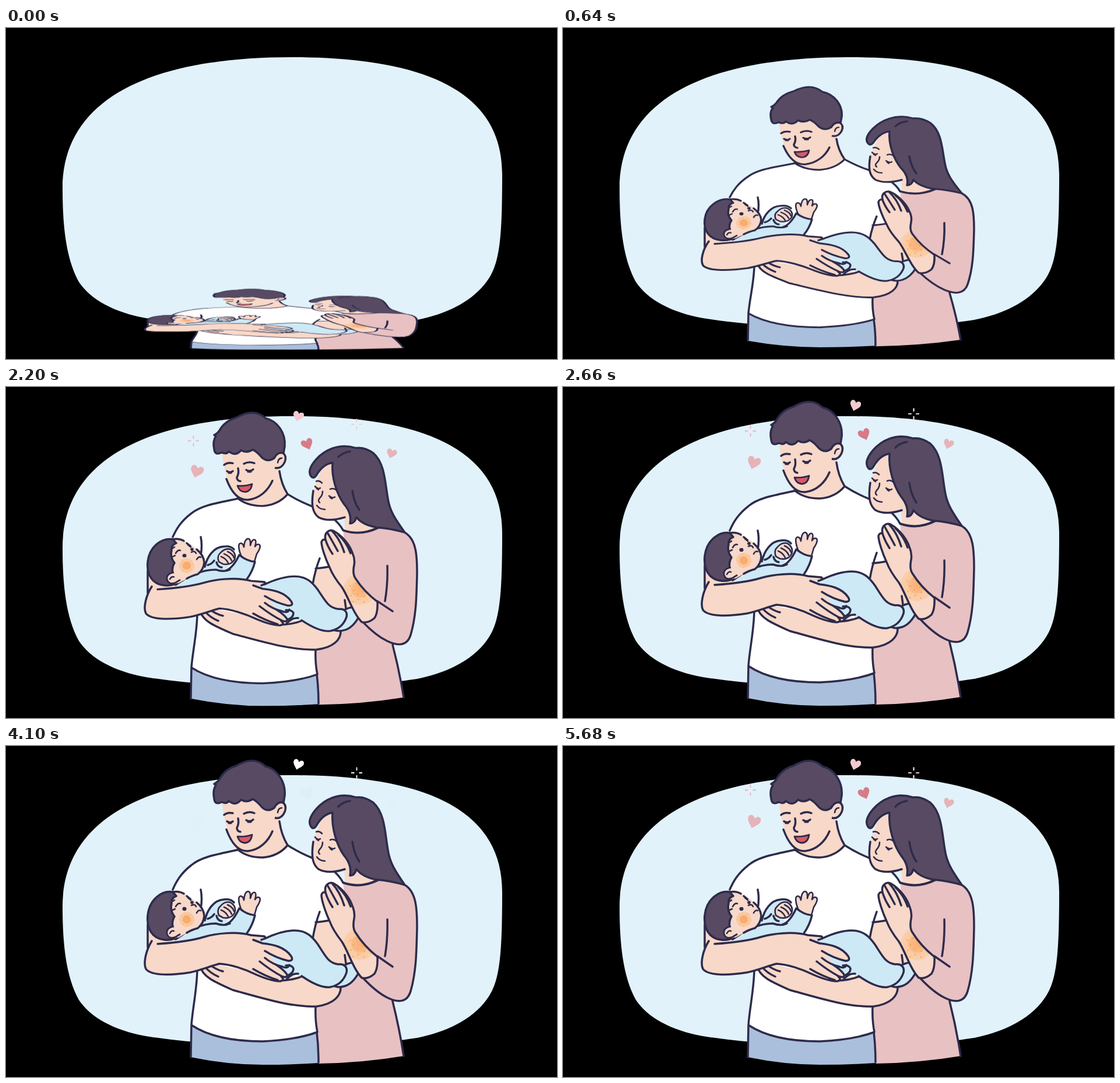
These frames come from a looping animation (945x567 px, 6 s). An HTML page:

```html
<!DOCTYPE html>
<html lang="en">
<head>
<meta charset="utf-8">
<title>Young family</title>
<style>
html, body { margin: 0; width: 100%; height: 100%; overflow: hidden; background: #000; }
svg { display: block; width: 100vw; height: 100vh; }
.line { fill: none; stroke: #2d2b4b; stroke-width: 3.5; stroke-linecap: round; stroke-linejoin: round; }
.thin { stroke-width: 2.6; }
.skin { fill: #f8d8c9; }
.hair { fill: #584a63; }
.shirt { fill: #fff; }
.jeans { fill: #aabfdc; }
.dress { fill: #e8c1c3; }
.baby { fill: #cde9f5; }
.edge { stroke: #2d2b4b; stroke-width: 3.5; stroke-linejoin: round; }
.dots { fill: #f0954f; }
</style>
</head>
<body>
<svg viewBox="0 0 945 567">
  <defs>
    <path id="heart" d="M0 10C-4 5-10 1-10-4C-10-11-2-11 0-5C2-11 10-11 10-4C10 1 4 5 0 10Z"/>
    <path id="spark" d="M0-9.5V-4M0 4V9.5M-9.5 0H-4M4 0H9.5" fill="none" stroke-width="1.8"/>
    <g id="charms">
      <use href="#heart" transform="translate(327 130) rotate(17) scale(1.12)" class="c1"/>
      <use href="#heart" transform="translate(501 32) rotate(17) scale(.9)" class="c2"/>
      <use href="#heart" transform="translate(517 81.500) rotate(-22)" class="c3"/>
      <use href="#heart" transform="translate(661 98) rotate(17) scale(.86)" class="c1"/>
      <use href="#spark" x="321.500" y="75.500" class="s1"/>
      <use href="#spark" x="601.500" y="46" class="s2"/>
    </g>
    <radialGradient id="rash">
      <stop offset="0" stop-color="#f9b076"/>
      <stop offset=".5" stop-color="#fabb86"/>
      <stop offset=".58" stop-color="#fbcaa0"/>
      <stop offset="1" stop-color="#f9cfac"/>
    </radialGradient>
    <path id="forearm" d="M555 300C548 285 541 264 541 255Q543 249 548 251Q546 241 551 237Q557 232 563 236C577 244 590 261 594 274Q599 285 597 296Q594 311 599 319C609 335 623 350 637 361Q638 381 632 390Q621 400 610 397C595 381 587 352 576 335Q561 316 555 300Z"/>
    <clipPath id="armClip"><use href="#forearm"/></clipPath>
  </defs>

  <g class="squash"><g id="matte"><use href="#charms" style="--a:#fff;--b:#fff;--c:#fff"/></g></g>
  <path fill="#e1f2fb" d="M97 275C97 120 250 50 490 50C740 50 851 120 851 250C851 370 846 410 820 440C795 470 755 490 705 500C640 510 560 514 470 514C390 513 310 508 240 497C185 487 145 465 125 435C103 395 97 340 97 275Z"/>

  <g class="squash">
    <g id="glow"><use href="#charms" style="--a:#e6b3b8;--b:#f2cad0;--c:#d67b87"/></g>

    <!-- dress -->
    <path class="dress" d="M578 234Q608 245 638 230L684 238C704 250 705 280 705 310C704 350 704 385 694 420C688 438 678 440 663 437Q675 485 682 531Q610 543 536 544L528 440L565 300Z"/>
    <path class="line" d="M578 234Q608 245 638 230M684 238C704 250 705 280 705 310C704 350 704 385 694 420C688 440 672 440 654 431C638 423 625 411 612 397M663 437Q675 485 682 531"/>

    <!-- man: clothes -->
    <path class="jeans" d="M318 478L317 533Q380 546 440 546Q490 546 536 543L534 490Z"/>
    <path class="shirt" d="M397 178C360 186 335 190 318 204C300 218 292 232 286 246L280 330L328 360V385C327 420 320 450 318 478Q360 506 440 506Q500 503 534 490L531 446L530 302L553 299L582 270L578 234Q560 214 525 192Q505 182 483 170Z"/>
    <path class="line" d="M397 178C360 186 335 190 318 204C300 218 292 232 286 246M328 385C327 420 320 450 318 478Q360 506 440 506Q500 503 534 490M483 170Q505 184 526 192Q566 210 578 234M531 446Q530 470 534 490M318 478L317 533M533 490Q536 515 536 542M334 246Q337 260 334 280"/>

    <!-- man: head -->
    <path class="skin" d="M370 93C373 130 388 172 397 178Q413 191 440 191Q467 189 483 170Q472 154 468 126L479 112V98L450 70H380Z"/>
    <path class="line" d="M397 177Q413 191 440 191Q467 189 483 170Q472 152 469 129M378 143C386 165 397 181 415 180C435 178 450 163 457 146"/>
    <path class="skin edge" d="M460 104Q466 94 475 97Q482 102 478 113Q472 126 461 123"/>
    <path class="line thin" d="M466 114Q467 106 473 106"/>
    <path class="hair edge" d="M357 65Q363 62 366 57Q375 40 395 34Q425 16 445 35C466 40 480 62 478 85L476 97Q466 94 460 106Q449 114 439 105Q430 94 423 91Q413 98 403 92Q394 104 382 94Q379 100 370 96Q358 102 357 90Q354 76 360 67Z"/>
    <path class="line" d="M374 118Q380 113 389 115M408 116Q417 111 426 115M398 124Q400 133 396 140Q396 146 402 147"/>
    <path class="line" d="M379 129Q385 133 389 129M382 132H386M412 127Q419 131 424 126M415 130H420"/>
    <path class="edge" fill="#dc5865" d="M397 155Q411 156 422 152Q420 166 409 166Q400 165 397 155Z" style="stroke-width:2.8"/>

    <!-- man: far arm -->
    <path class="skin" d="M531 302L553 299L590 330V380L574 415C575 430 562 443 533 446C490 448 440 432 389 418C355 403 338 395 333 378Q338 371 348 372L440 390L500 395L526 330Z"/>
    <path class="line" d="M538 284Q530 306 526 330M531 302Q542 301 553 299M333 378C338 395 355 403 389 418C440 432 490 448 533 446C562 442 575 428 574 412M333 378Q336 372 345 373M341 378Q350 389 364 395M350 375Q360 383 372 386M462 402Q490 403 512 393M581 358L584 380"/>

    <!-- baby: legs -->
    <path class="baby edge" d="M578 377Q592 368 602 373L606 386Q596 406 582 411Q567 416 558 408Z"/>
    <path class="baby" d="M405 325L444 330C465 320 480 316 495 316C515 316 525 326 535 340C548 360 553 372 570 374C580 373 586 378 584 388C580 400 572 410 556 413C540 415 520 403 507 394C495 388 480 395 470 404L420 380Z"/>
    <path class="line" d="M444 330C465 320 480 316 495 316C515 316 525 326 535 340C548 360 553 372 570 374C580 373 586 378 584 388C580 400 572 410 556 413C540 415 520 403 507 394M481 400Q490 389 501 390M480 376Q490 375 493 381Q493 390 482 393"/>

    <!-- baby: body -->
    <path class="skin" d="M243 306V350L305 345V310Z"/>
    <path class="line" d="M243 306V345"/>
    <path class="baby" d="M330 318L340 300C343 280 357 264 373 263Q387 262 393 272L375 310Z"/>
    <path class="line" d="M341 299C345 280 357 264 373 263Q385 261 391 268M346 296Q353 294 357 288M361 291Q363 299 370 300"/>
    <path class="skin edge" style="stroke-width:2.6" d="M365 290Q361 280 368 274Q376 265 385 268Q396 275 392 286Q386 297 372 294Z"/>
    <path class="line thin" d="M369 281Q377 284 381 292M374 276Q384 280 387 288M380 272Q389 276 391 283"/>
    <path class="skin edge" style="stroke-width:2.6" d="M403 279C399 268 397 257 403 257Q407 258 408 264Q409 250 415 249Q420 249 419 261Q422 249 427 251Q430 253 427 263Q431 257 435 260Q438 264 430 276L426 290Q412 289 403 279Z"/>
    <path class="baby" d="M282 340C310 322 335 305 360 306Q375 309 384 304L400 278Q413 288 427 290Q422 308 413 322V340L280 348Z"/>
    <path class="line" d="M291 331C315 315 335 304 360 304Q374 309 384 304M376 306Q389 302 400 278Q413 289 427 290Q423 307 413 321"/>

    <!-- baby: head -->
    <path class="skin" d="M284 250Q300 246 313 258Q335 268 340 290Q341 305 330 312Q310 320 296 328L275 329L265 290Z"/>
    <path class="line" d="M286 250Q297 248 305 253M310 257L316 262M327 268Q339 278 340 291Q339 304 329 312Q318 315 310 320"/>
    <path class="hair edge" d="M286 250C268 247 246 262 243 290C241 312 250 330 272 332Q280 333 289 330L282 322L286 311Q284 300 289 292Q281 282 284 270Q283 260 292 257Z"/>
    <path class="skin edge" style="stroke-width:2.8" d="M288 309Q275 311 276 321Q279 332 291 327L299 322"/>
    <path class="line thin" d="M281 321Q284 315 288 317M284 267L289 264M286 281L290 279M291 275Q295 268 299 270M312 260L317 264"/>
    <ellipse cx="306" cy="279" rx="3.500" ry="3.200" fill="#2d2b4b"/>
    <circle cx="319" cy="268" r="2.800" fill="#2d2b4b"/>
    <path class="line thin" d="M318 273Q324 270 326 275M327 286Q330 280 334 282"/>
    <circle cx="310" cy="297" r="13" fill="#fbc493" opacity=".7"/>
    <circle cx="310" cy="297" r="7" fill="#f9ad70"/>
    <g id="cheek" class="dots" opacity=".7"></g>

    <!-- man: near arm -->
    <path class="skin" d="M249 335C240 350 235 372 240 382C250 395 290 392 315 388C335 384 350 377 366 373C385 374 410 382 430 392Q455 403 470 403Q477 402 473 396Q485 400 482 393Q478 384 465 376Q456 364 448 352Q470 363 484 368Q494 368 489 360C478 344 458 340 440 338L424 333Q440 333 445 329Q440 323 420 324C395 317 355 322 340 327C310 335 285 337 262 337Z"/>
    <path class="line" d="M250 334C240 350 235 372 240 382C250 395 290 392 315 388C335 384 350 377 366 373C385 374 410 382 430 392Q455 403 470 403Q479 401 472 395M435 369Q455 385 474 395Q485 398 481 390Q475 382 462 374M424 382Q444 394 466 401M444 351Q463 363 484 368Q494 368 489 360C478 344 458 340 440 338L424 332M444 363Q457 374 474 378Q483 382 486 375M260 339C290 337 320 333 340 327C360 321 395 317 420 324L443 326Q448 329 438 332"/>

    <!-- woman: head -->
    <path class="skin" d="M528 160C523 190 526 203 536 211Q550 219 580 214L582 235Q608 243 636 230L605 150L562 110L540 128Z"/>
    <path class="line" d="M527 164C523 190 526 203 536 211Q553 220 581 211M578 234Q608 244 636 230"/>
    <path class="hair edge" d="M560 114C558 140 567 170 580 188C590 200 592 212 590 222Q598 222 601 211Q612 225 636 229Q660 231 684 238C668 215 658 200 655 178C650 150 650 115 630 97Q615 86 600 88C570 78 545 93 532 108C520 122 519 132 523 138Q527 144 532 137Q543 117 560 114Z"/>
    <path class="line" d="M594 164Q597 185 606 198M570 104Q577 96 590 94"/>
    <path class="line thin" d="M532 147Q537 145 542 150M556 161Q562 158 568 164M530 156Q535 162 539 159M533 160L536 162M554 173Q560 178 564 175M556 176L559 178M543 165Q543 172 538 177Q534 182 538 185M533 190Q538 197 547 197"/>

    <!-- woman: clasped hands and forearm -->
    <use href="#forearm" class="skin"/>
    <g clip-path="url(#armClip)">
      <circle cx="607" cy="339" r="28" fill="url(#rash)"/>
      <g id="wrist" class="dots"></g>
    </g>
    <use href="#forearm" class="line"/>
    <path class="line" d="M548 251Q552 264 560 276M551 238Q560 254 569 271M559 235Q573 250 580 273M570 242Q584 255 591 275M654 297Q655 330 650 360M637 360L663 378"/>
  </g>
</svg>
<style>
.c1 { fill: var(--a); } .c2 { fill: var(--b); } .c3 { fill: var(--c); }
.s1 { stroke: var(--a); } .s2 { stroke: var(--b); }
</style>
<script>
const LOOP = 6000, HALF = 3020, STEP = 20, FLOOR = 552.5;
const $ = id => document.getElementById(id);
const squash = document.querySelectorAll('.squash');
const clamp = x => Math.min(1, Math.max(0, x));
const ease = x => (1 - Math.cos(Math.PI * clamp(x))) / 2;

function freckles(id, cx, cy, r, n, size) {
  let out = '';
  for (let i = 0; i < n; i++) {
    const a = i * 2.4, d = r * Math.sqrt((i + 0.5) / n);
    out += `<circle cx="${cx + d * Math.cos(a)}" cy="${cy + d * Math.sin(a)}" r="${size}"/>`;
  }
  $(id).innerHTML = out;
}
freckles('cheek', 310, 297, 12, 22, 0.7);
freckles('wrist', 608, 343, 23, 16, 1.1);

function height(p) {
  if (p < 890) return 0.2 + 0.8 * ease(p / 887);
  const dip = clamp((p - 2025) / 640);
  return 1 - 0.062 * (1 - Math.cos(2 * Math.PI * dip)) / 2;
}

function draw(now) {
  const t = Math.floor((now % LOOP) / STEP) * STEP;
  const p = t < HALF ? t : t - HALF;
  const s = height(p);
  const m = `matrix(1 0 0 ${s} 0 ${FLOOR * (1 - s)})`;
  squash.forEach(g => g.setAttribute('transform', m));
  $('matte').setAttribute('opacity', p >= 1080 ? 1 : 0);
  $('glow').setAttribute('opacity', clamp((p - 1060) / 640));
}

let start;
function tick(now) {
  start ??= now;
  draw(now - start);
  requestAnimationFrame(tick);
}
draw(0);
requestAnimationFrame(tick);
</script>
</body>
</html>
```
